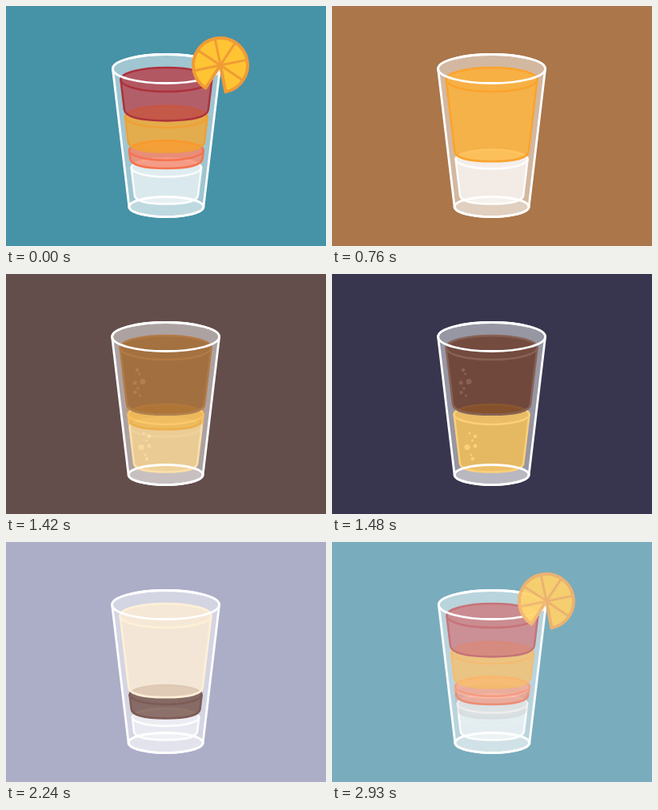
An HTML page with a canvas for the animation above (2960 ms loop, 400x300 px).

```html
<!DOCTYPE html>
<html lang="en">
<head>
<meta charset="utf-8">
<title>Layered shots</title>
<style>
html, body { margin: 0; width: 100%; height: 100%; overflow: hidden; }
canvas { display: block; width: 400px; height: 300px; }
</style>
</head>
<body>
<canvas id="stage"></canvas>
<script>
const W = 400, H = 300, LOOP = 2960, TICK = 30;
const ratio = window.devicePixelRatio || 1;
const TAU = Math.PI * 2;

function setUp(canvas) {
  canvas.width = W * ratio;
  canvas.height = H * ratio;
  const c = canvas.getContext('2d');
  c.scale(ratio, ratio);
  c.lineJoin = c.lineCap = 'round';
  return c;
}

// Inner wall of the glass: half width and ellipse depth at a height
const halfWidth = y => 57 - 0.12 * (y - 92);
const depth = y => halfWidth(y) * 0.265;

const clear = (top, alpha = 0.62) =>
  ({ top, bottom: 237, fill: '#fff', line: 'rgba(255,255,255,.9)', alpha });

// Layers run from the bottom of the glass upwards
const drinks = [
  { bg: '#4692a7', cx: 200.4, slice: true, layers: [
    clear(202),
    { top: 180.5, bottom: 191, fill: '#fc8264', line: '#f57350' },
    { top: 138.5, bottom: 170, fill: '#faa523', line: '#efa036' },
    { top: 92, bottom: 129.5, fill: '#ba3c48', line: '#ac323c' }
  ] },
  { bg: '#aa764a', cx: 199.6, layers: [
    clear(191.5, 0.72),
    { top: 92, bottom: 182, fill: '#ffb02c', line: '#fba32c' }
  ] },
  { bg: '#38364e', cx: 199.6, layers: [
    { top: 175.5, bottom: 237, fill: '#ffc34c', line: '#fcd078',
      bubbles: [[172, 199, 1.6], [179, 203, 2.2], [175.5, 208, 1.5], [169, 216.5, 3.6],
        [179, 215, 2.4], [174, 226, 1.5], [176, 231, 2.2]] },
    { top: 92, bottom: 163, fill: '#632e1a', line: '#876255',
      bubbles: [[164, 120, 2.3], [166.5, 125, 1.5], [171, 134.5, 3.5], [161, 136, 2.5],
        [165, 143, 1.8], [161.5, 148, 2.2], [167.5, 152, 1.6]] }
  ] },
  { bg: '#acaec8', cx: 199.6, layers: [
    clear(219, 0.5),
    { top: 191, bottom: 209, fill: '#6d493d', line: '#7d5c56' },
    { top: 92, bottom: 182, fill: '#ffedd2', line: '#fff0d6' }
  ] }
];

function oval(c, x, y, rx, ry) {
  c.beginPath();
  c.ellipse(x, y, rx, ry, 0, 0, TAU);
}

function drawLiquid(c, cx, { top, bottom, fill, line, alpha = 0.75, bubbles = [] }) {
  const wt = halfWidth(top), wb = halfWidth(bottom);
  const low = bottom + depth(bottom), bend = bottom + depth(bottom) * 0.75;
  c.beginPath();
  c.ellipse(cx, top, wt, depth(top), 0, Math.PI, TAU);
  c.lineTo(cx + wb, bottom);
  c.bezierCurveTo(cx + wb - 1, bend, cx + wb * 0.5, low, cx, low);
  c.bezierCurveTo(cx - wb * 0.5, low, cx - wb + 1, bend, cx - wb, bottom);
  c.closePath();
  c.fillStyle = fill;
  c.globalAlpha = alpha;
  c.fill();
  c.globalAlpha = 1;
  c.strokeStyle = line;
  c.lineWidth = 2.5;
  c.stroke();

  oval(c, cx, top, wt, depth(top));
  c.fillStyle = line;
  c.globalAlpha = 0.15;
  c.fill();
  c.globalAlpha = 1;
  c.beginPath();
  c.ellipse(cx, top, wt, depth(top), 0, 0, Math.PI);
  c.stroke();

  for (const [x, y, r] of bubbles) {
    oval(c, x, y, r, r);
    c.fill();
  }
}

function glassBody(c, cx) {
  c.beginPath();
  c.ellipse(cx, 78.5, 67, 18, 0, Math.PI, TAU);
  c.lineTo(cx + 46.5, 251);
  c.ellipse(cx, 251, 46.5, 12.5, 0, 0, Math.PI);
  c.closePath();
}

function drawSlice(c) {
  const x = 268, y = 74, r = 34, rad = Math.PI / 180;
  const from = 123 * rad, to = (79 + 360) * rad;
  c.fillStyle = '#ffc433';
  c.strokeStyle = '#f09b36';
  c.lineWidth = 4;
  c.beginPath();
  c.moveTo(x, y);
  c.arc(x, y, r, from, to);
  c.closePath();
  c.fill();
  c.stroke();
  c.lineWidth = 3;
  c.beginPath();
  for (let i = 1; i < 7; i++) {
    const a = from + (to - from) * i / 7;
    c.moveTo(x, y);
    c.lineTo(x + r * Math.cos(a), y + r * Math.sin(a));
  }
  c.stroke();
}

function paintDrink({ bg, cx, slice, layers }) {
  const canvas = document.createElement('canvas');
  const c = setUp(canvas);
  c.fillStyle = bg;
  c.fillRect(0, 0, W, H);
  c.fillStyle = 'rgba(255,255,255,.48)';
  glassBody(c, cx);
  c.fill();
  c.fillStyle = 'rgba(255,255,255,.32)';
  oval(c, cx, 251, 46.5, 12.5);
  c.fill();

  layers.forEach(layer => drawLiquid(c, cx, layer));

  c.strokeStyle = '#fff';
  c.lineWidth = 2.8;
  glassBody(c, cx);
  c.stroke();
  oval(c, cx, 78.5, 67, 18);
  c.stroke();
  oval(c, cx, 251, 46.5, 12.5);
  c.stroke();
  if (slice) drawSlice(c);
  return canvas;
}

const scenes = drinks.map(paintDrink);
const ctx = setUp(document.getElementById('stage'));

const cuts = [670, 1390, 2150, 2870];
const fade = [0.34, 0.62, 0.86];
const lastFade = [0.2, 0.44, 0.67];

function show(scene, alpha) {
  ctx.globalAlpha = alpha;
  ctx.drawImage(scene, 0, 0, W, H);
}

function draw(now) {
  const t = now % LOOP;
  const past = cuts.filter(cut => t >= cut).length;
  const step = past ? Math.floor((t - cuts[past - 1]) / TICK) : 3;
  ctx.globalAlpha = 1;
  ctx.fillStyle = '#fff';
  ctx.fillRect(0, 0, W, H);
  if (step > 2) {
    show(scenes[past % 4], 1);
  } else {
    // The closing fade lets white through from behind
    const last = past === 4;
    const a = (last ? lastFade : fade)[step];
    show(scenes[past - 1], last ? 1 - a : 1);
    show(scenes[past % 4], a);
  }
}

const start = performance.now();
function tick() {
  draw(performance.now() - start);
  requestAnimationFrame(tick);
}
tick();
</script>
</body>
</html>
```
